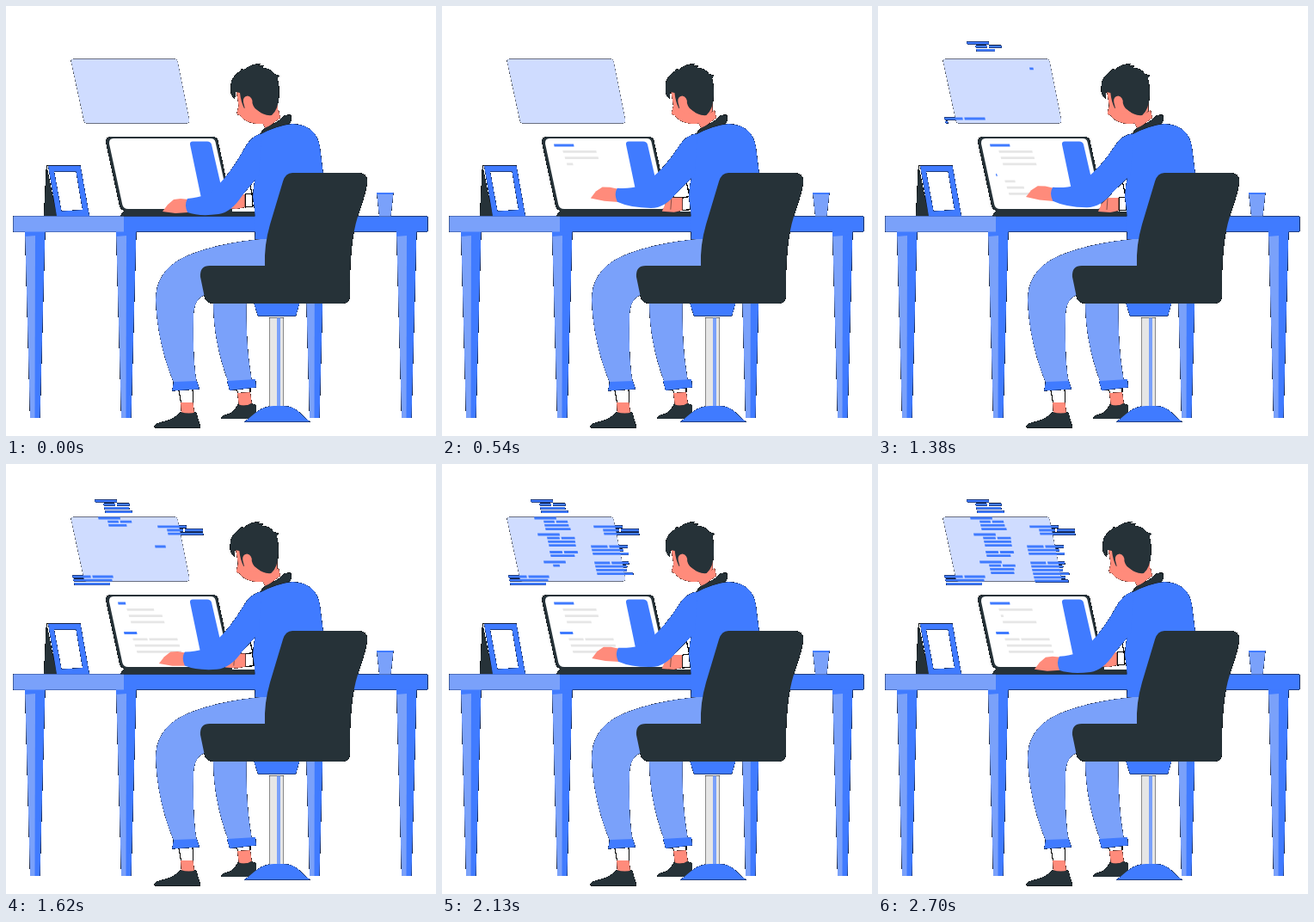
An HTML page with a canvas that plays this animation: 500x500 px, repeating every 2730 ms.

```html
<!DOCTYPE html>
<html lang="en">
<head>
<meta charset="utf-8">
<title>Working at a desk</title>
<style>
  html, body { margin: 0; width: 100%; height: 100%; overflow: hidden; background: #fff; }
  canvas { display: block; width: 500px; height: 500px; }
</style>
</head>
<body>
<canvas id="stage" width="500" height="500"></canvas>
<script>
const LOOP = 2730, STEP = 30, SIZE = 500;
const BLUE = '#407bff', LIGHT = '#7aa1fa', PALE = '#cfdcff', DARK = '#263238',
      SKIN = '#ff8b7b', GREY = '#e6e6e6', WHITE = '#fff';

const stage = document.getElementById('stage').getContext('2d');
const scene = document.createElement('canvas');
scene.width = scene.height = SIZE;
const g = scene.getContext('2d', { willReadFrequently: true });

const clamp = v => Math.max(0, Math.min(1, v));
const noise = n => Math.abs(Math.sin(n * 12.9898 + 4.1) * 43758.5453) % 1;

function shape(color, d) {
  g.fillStyle = color;
  g.fill(new Path2D(d));
}
function line(d, width = 0.7) {
  g.strokeStyle = '#111';
  g.lineWidth = width;
  g.stroke(new Path2D(d));
}
function hole(d) {
  g.globalCompositeOperation = 'destination-out';
  shape('#000', d);
  g.globalCompositeOperation = 'source-over';
}
function bar(color, x, y, w) {
  if (w > 0) shape(color, `M${x} ${y - 1.4}h${w}l.6 2.8h${-w}z`);
}
// A bar of which `w` is typed so far, with a word gap at `gap` if given.
function typedBar(color, x, y, w, gap = w) {
  bar(color, x, y, Math.min(w, gap));
  bar(color, x + gap + 2, y, w - gap - 2);
}

// Each block is a run of slanted code rows; a headed one indents its body.
const columns = [
  { start: 1215, step: 60, width: 29, blocks: [
    { x: 103, y: 43, rows: 4, indent: 9 }, { x: 107, y: 63, rows: 4, indent: 10 },
    { x: 111, y: 82, rows: 4, indent: 10 }, { x: 125, y: 102.5, rows: 2 },
    { x: 118, y: 114, rows: 4, indent: 10 }] },
  { start: 1370, step: 76, width: 38, blocks: [
    { x: 176, y: 72.8, rows: 3, indent: 10 }, { x: 173, y: 96, rows: 3 },
    { x: 177, y: 115, rows: 6 }] },
  { start: 1300, step: 75, width: 43, blocks: [{ x: 77, y: 131, rows: 3 }] }
];

function drawCode(t) {
  shape(PALE, 'M75.6 64Q75.600 61.4 79 61.4H196Q199 61.4 199.6 64.5L213.3 133Q213.3 136.4 210 136.4H94Q91 136.4 90.5 133Z');
  for (const { start, step, width, blocks } of columns) {
    let row = 0;
    for (const { x, y, rows, indent = 0 } of blocks) {
      for (let i = 0; i < rows; i++, row++) {
        const isHeader = indent && i === 0;
        const full = width * (isHeader ? 0.88 : 0.92 + 0.22 * noise(row + width));
        const typed = full * clamp((t - start) / step - row);
        const gapAt = i === (indent ? 1 : 0) ? full * 0.45 : undefined;
        typedBar(BLUE, x + i + (i ? indent : 0), y + i * 4.2, typed, gapAt);
      }
    }
  }
}

// Screen rows type in one after another, then each retypes on its own beat.
const paragraphs = [
  { x: 130, y: 162, title: 23, width: 39, period: 810, phase: -50, lag: 155 },
  { x: 137, y: 196.5, title: 15, width: 52, period: 1020, phase: 370, lag: 20 }
];

function retype(t, period, phase) {
  const away = ((t - phase) % period + period) % period;
  return clamp(Math.min(away, period - away) / 130);
}

function drawScreenText(t) {
  paragraphs.forEach(({ x, y, title, width, period, phase, lag }, n) => {
    for (let i = 0; i < 4; i++) {
      const opened = clamp((t - 240) / 94 - n * 4 - i);
      const w = (i ? width : title) * opened * retype(t, period, phase + lag * i);
      const left = i ? x + 8 + 2.3 * i : x;
      typedBar(i ? GREY : BLUE, left, y + 7.3 * i, w, n && i === 1 ? 17 : undefined);
    }
  });
}

function drawLeg(x) {
  shape(LIGHT, `M${x} 262h13L${x + 12} 479h-6z`);
  shape(BLUE, `M${x + 12} 262h11.5L${x + 17.5} 479h-6z`);
  shape(BLUE, `M${x} 262h23v3L${x + 12} 267L${x} 268z`);
}

function drawDesk() {
  [22, 128, 347, 454].forEach(drawLeg);
  shape(BLUE, 'M8.600 244.6H490.4V262.4H8.600Z');
  shape(LIGHT, 'M8.600 244.6H137V262.4H8.600Z');
  shape(DARK, 'M47 185L59 244H44Z');
  shape(BLUE, 'M49 185.6H86.5L97 244.6H59Z');
  hole('M56 192.6H81.5L89 237L64.5 238.5Z');
  line('M47 185.3H86.5');
  shape(LIGHT, 'M431 217H450.5L447.5 244.6H434Z');
  shape(BLUE, 'M431 217H450.5L450.2 219H431.3Z');
}

function drawLaptop(t) {
  shape(DARK, 'M116 158Q116 152 122 152H240Q245 152 246.5 157L263 235V239H289V244.6H133Q135 239 138 238Q133 237 132 232Z');
  shape(WHITE, 'M120 160Q119.5 154 125 154H238Q242.5 154 243.5 158L259.5 230Q260 236 255 236H142Q136.5 236 135.3 231Z');
  shape(BLUE, 'M214 161Q213.5 157.5 217 157.5H234Q238 157.5 239 161L253 222Q253 225 249 225H231Q227.5 225 226.5 221Z');
  drawScreenText(t);
}

function drawFarHand(reach) {
  g.save();
  g.translate(2 * (reach - 1), 4 * (reach - 1));
  shape(SKIN, 'M256 239L260 230L267 223H280V238L270 240Z');
  line('M267 224L266 237', 0.5);
  hole('M280 223L288 222L289 237L280 238Z');
  line('M280 223L288 222L289 237L280 238ZM284 203L288 222');
  g.restore();
}

function drawLegs() {
  shape(SKIN, 'M269 450L284 449L286 464L271 465Z');
  shape(SKIN, 'M203 461H217.5L219 474H204Z');
  line('M201 447L203.5 461M217.5 461L217 446M268 446L270 450M284 449.5V444', 0.6);
  shape(DARK, 'M250 479Q251 476 260 474Q266 470 270 463Q278 467 285 462L291 464V480H251Z');
  shape(DARK, 'M172 489Q173 485 184 483Q196 480 203 472Q213 475 221 472L226 489V490.5H173Z');
  shape(LIGHT, 'M240 336H280Q278 392 286 436H258Q241 390 241 344Z');
  shape(LIGHT, 'M305 270Q240 276 205 293Q174 309 174 342Q176 392 195 438H222Q217 415 218 362Q218 338 235 335L305 320Z');
  shape(BLUE, 'M257 436L290 434L291 443.5L260 447Z');
  shape(BLUE, 'M195 437L222 436L225 445.5L193 447.5Z');
}

// Lifts a path forward, more the farther a point lies from the shoulder.
function lifted(d, reach) {
  return d.replace(/(\d+) (\d+)/g, (_, x, y) => {
    const pull = reach * clamp((297 - x) / 110);
    return `${x - 10 * pull} ${y - 17 * pull}`;
  });
}

function drawBody(reach) {
  shape(BLUE, 'M296 149Q315 139 333 137Q361 138 365 164L369 196L340 271H289.5Q291 245 287 222Q288 205 291 196Z');
  shape(SKIN, lifted('M182 239L188 231L195 225L203 224L213 225L212 240L197 241Z', reach));
  shape(BLUE, lifted('M297 148Q284 152 277 166Q262 193 246 209Q236 222 211 224Q207 231 211 240Q225 245 247 242Q262 240 275 220L294 197Z', reach));
}

function drawHead(reach) {
  shape(SKIN, 'M297 134L317 121L319 130L302 143Z');
  g.save();
  g.translate(-1.7 * reach, 0);
  shape(SKIN, 'M268 100L270.5 116L268.5 124Q268.5 127 272 127Q276 134 288 136.5Q300 139 305 133L316 122V98Z');
  shape(DARK, 'M264 106L261.5 101Q261 93 262 88Q265 80 272 76L274 73L277 74Q285 67 296 67L293 69.5L300 69.500L298 72Q308 72 312 79L318 81L315.5 84Q318 92 317.5 104Q317 120 309 127Q300 128 292 121L285 116L277 119Q273 111 272 101L267 100L266 108Z');
  shape(SKIN, 'M276 112Q275 105 281 104.5Q287 106 286.5 113Q288 120 296 124L285 126L278 120Z');
  g.restore();
  shape(DARK, 'M295 149.5Q299 142 305 140Q318 134 324 127L331 126.5Q333 132 330 137Q312 140 295 149.5Z');
}

function drawChair() {
  shape(BLUE, 'M288 345H341.5L337 360.5H293Z');
  shape(GREY, 'M306.4 362.6H322.6V467H306.4Z');
  shape(LIGHT, 'M315 362.6H319V467H315Z');
  shape(BLUE, 'M276 483.4C286 480 292 465 312 465H322C340 465 344 478 354 483.4Z');
  shape(DARK, 'M333 194H411Q421 195 420 206Q418 219 409 245Q399 276 400 337Q400 346 391 346H242Q233 346 231 339L226 315Q225 302 237 302H301Q300 278 307 254L322 204Q325 194 333 194Z');
}

// Hard cut-out on white: soft edge pixels turn dark instead of blending.
function cutOut() {
  const image = g.getImageData(0, 0, SIZE, SIZE), px = image.data;
  for (let i = 0; i < px.length; i += 4) {
    const alpha = px[i + 3];
    if (alpha === 255) continue;
    for (let c = i; c < i + 3; c++) px[c] = alpha < 64 ? 255 : px[c] * alpha / 255;
    px[i + 3] = 255;
  }
  stage.putImageData(image, 0, 0);
}

function frame(now) {
  const t = Math.floor((now % LOOP) / STEP) * STEP;
  const reach = (1 - Math.cos(t / LOOP * 6 * Math.PI)) / 2;
  g.clearRect(0, 0, SIZE, SIZE);
  drawCode(t);
  drawDesk();
  drawLaptop(t);
  drawFarHand(reach);
  drawLegs();
  drawBody(reach);
  drawHead(reach);
  drawChair();
  cutOut();
}

const began = performance.now();
function tick() {
  frame(performance.now() - began);
  requestAnimationFrame(tick);
}
tick();
</script>
</body>
</html>
```
